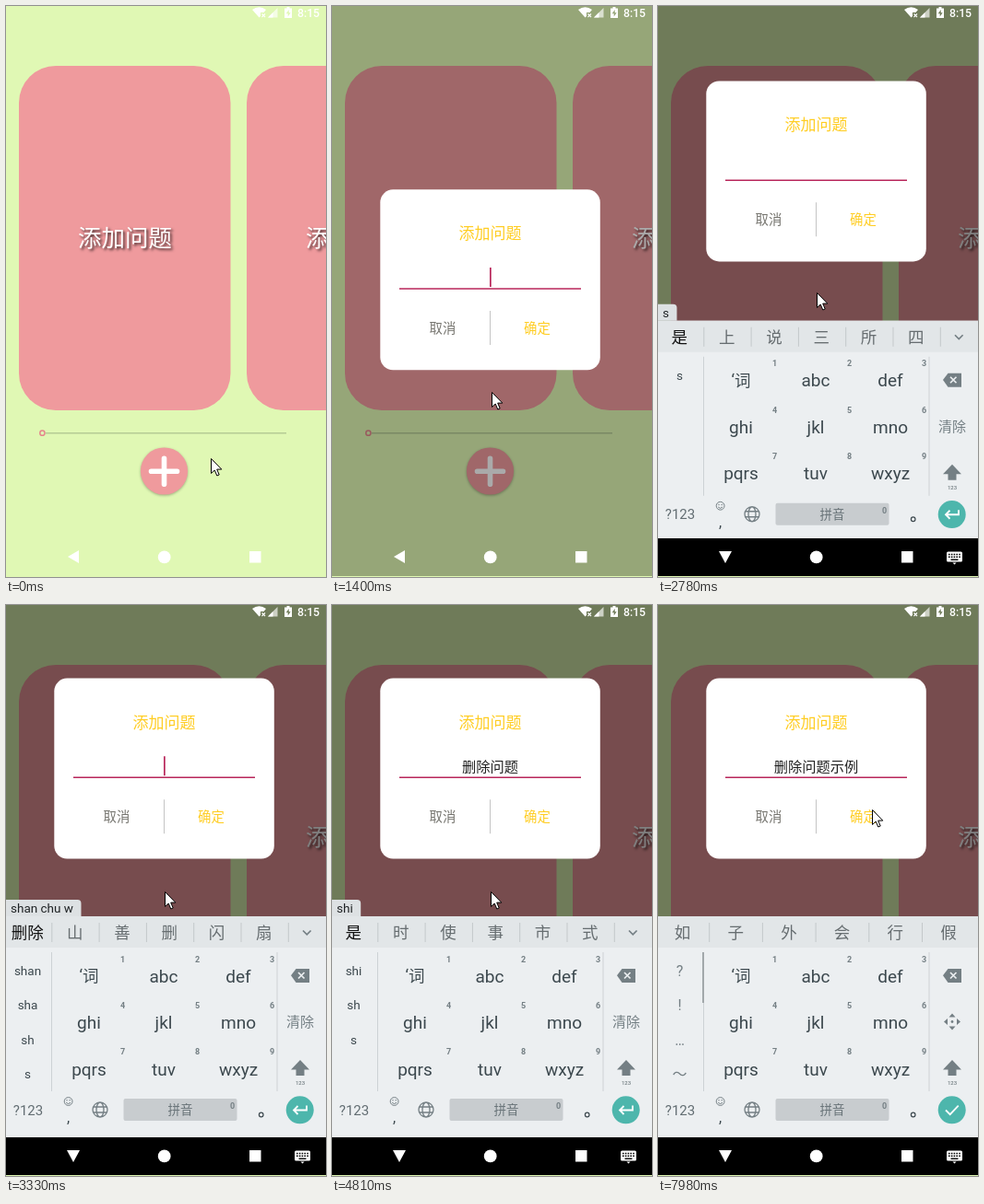
Animation of 347 by 620 pixels, one loop 8 s. Source, as an HTML page with a canvas:

```html
<!DOCTYPE html>
<html lang="zh-CN">
<head>
<meta charset="utf-8">
<style>
  html, body { margin: 0; width: 347px; height: 620px; overflow: hidden; background: #e0f8b4; }
  canvas { display: block; }
</style>
</head>
<body>
<canvas id="stage" width="347" height="620"></canvas>
<script>
const W = 347, H = 620, LOOP = 8000, TICK = 77.4;
const GREEN = '#e0f8b4', PINK = '#ef9a9d', YELLOW = '#ffcd22', ACCENT = '#b8265a';
const KEY = '#3c484e', SOFT = '#747f84', RULE = '#cdd2d5';
const FONT = 'Roboto, "Noto Sans CJK SC", "Noto Sans CJK", sans-serif';
const c = document.getElementById('stage').getContext('2d');

// Everything below is timed in screen ticks.
const POINTER = [[0, 222, 491], [4, 187, 500], [7, 187, 500], [9, 177, 500], [15, 177, 500],
  [16, 173, 473], [22, 172, 311], [77, 172, 311], [83, 116, 335], [85, 98, 344],
  [88, 147, 345], [91, 232, 351], [98, 232, 351], [103, 232, 222]];
const PINYIN = [[0, ''], [36, 's'], [37, 'sh'], [38, 'sha'], [39, 'shan'], [41, 'shan ch'],
  [42, 'shan chu'], [43, 'shan chu w'], [44, 'shan chu we'], [45, 'shan chu wen'],
  [46, 'shan chu wen t'], [47, 'shan chu wen ti'], [55, ''], [59, 's'], [60, 'sh'],
  [62, 'shi'], [63, 'shi l'], [64, 'shi li'], [93, '']];
const FIELD = [[0, ''], [55, '删除问题'], [93, '删除问题示例']];
const NEXT_WORDS = [[0, ''], [56, '是 的 和 了 在 就'], [93, ''], [95, '如 子 外 会 行 假']];
const BLINK_START = [[0, 16], [55, 55], [93, 93]];
const CANDIDATES = {
  'shan chu wen t': '删除问题 删除 山 善 删',
  'shan c': '删除 山 善 删 闪 扇',
  'shan': '山 善 删 闪 扇 衫',
  'sha': '啥 杀 傻 沙 纱 厦',
  'shi l': '实例 实力 势力 视力 示例 市里',
  'shi': '是 时 使 事 市 式',
  'sh': '是 上 说 时 使 事',
  's': '是 上 说 三 所 四'
};

const clamp = v => Math.max(0, Math.min(1, v));
const easeOut = (v, power) => 1 - (1 - clamp(v)) ** power;
const valueAt = (list, n) => list.filter(e => e[0] <= n).pop()[1];

function pointerAt(n) {
  const i = POINTER.findIndex(p => p[0] > n);
  if (i < 0) return POINTER[POINTER.length - 1].slice(1);
  const [a, b] = [POINTER[i - 1], POINTER[i]], k = (n - a[0]) / (b[0] - a[0]);
  return [1, 2].map(j => Math.round(a[j] + (b[j] - a[j]) * k));
}

function rect(x, y, w, h, color, r = 0) {
  c.fillStyle = color;
  c.beginPath();
  c.roundRect(x, y, w, h, r);
  c.fill();
}
function disc(x, y, r, color) {
  c.fillStyle = color;
  c.beginPath();
  c.arc(x, y, r, 0, 7);
  c.fill();
}
function fill(d, color) {
  c.fillStyle = color;
  c.fill(new Path2D(d));
}
function stroke(d, color, width = 1, cap = 'butt') {
  c.strokeStyle = color;
  c.lineWidth = width;
  c.lineCap = cap;
  c.stroke(new Path2D(d));
}
function text(s, x, y, size, color, align = 'center', weight = 400) {
  c.font = `${weight} ${size}px ${FONT}`;
  c.textAlign = align;
  c.fillStyle = color;
  c.fillText(s, x, y + size * 0.37);
}
function shadow(color, blur, dx, dy) {
  c.shadowColor = color;
  c.shadowBlur = blur;
  c.shadowOffsetX = dx;
  c.shadowOffsetY = dy;
}

function drawHome(n) {
  rect(0, 0, W, H, GREEN);
  for (const x of [14, 261]) {
    rect(x, 65, 229.5, 374, PINK, 40);
    c.save();
    shadow('rgba(0,0,0,.7)', 3, 2, 2);
    text('添加问题', x + 115, 252, 25.5, '#fff');
    c.restore();
  }
  stroke('M43 463.7H304', '#b6cc95', 1.5);
  stroke('M42 463.7a2.6 2.6 0 1 1-5.2 0a2.6 2.6 0 1 1 5.2 0', '#e5868c', 1.5);

  const pressed = n >= 12 && n <= 14;
  c.save();
  shadow('rgba(0,0,0,.3)', pressed ? 8 : 3, 0, pressed ? 3 : 1);
  disc(171.5, 505, 25.6, PINK);
  c.restore();
  if (pressed) disc(171.5, 505, 25.6, 'rgba(255,255,255,.2)');
  stroke('M157.5 505.3H185.5M171.5 491.3V519.3', '#fff', 5.6, 'round');
}

function drawStatusBar() {
  fill('M267 4Q274.500 -1.500 282 4L279.500 7H276V11L274.500 12.500Z', '#fff');
  stroke('M277.500 8.500l3.500 3.500m0-3.500l-3.500 3.500', '#fff', 1.1);
  fill('M284 12.500L294.500 2V12.500Z', 'rgba(255,255,255,.65)');
  fill('M284 12.500L289.500 7V12.500Z', '#fff');
  fill('M302 2.500h2.500v-1.500h3v1.500h2.500v10.500h-8ZM306.700 4l-3 4.300h2v3.200l3-4.300h-2Z', '#fff');
  text('8:15', 328, 7.3, 12.3, '#fff', 'center', 500);
}

function drawNavBar(n) {
  if (n >= 34) rect(0, 578, W, 41, '#000');
  fill(n >= 32 ? 'M66 592H80L73 605Z' : 'M67 598L79 591V605Z', '#fff');
  disc(171.7, 598.4, 6.9, '#fff');
  rect(264, 592, 12.5, 12.5, '#fff');
  if (n < 32) return;
  rect(313, 592.5, 17, 11, '#fff', 1.5);
  for (let i = 0; i < 10; i++) rect(315 + i % 5 * 2.8, i < 5 ? 594.7 : 597.5, 1.6, 1.6, '#000');
  rect(317.5, 600.5, 8, 1.4, '#000');
  fill('M319.500 604.500h4l-2 2Z', '#fff');
}

function drawDialog(n, lift) {
  const ms = (n - 16) * TICK + 19;
  const scale = 0.9 + 0.1 * easeOut(ms / 220, 5);
  c.save();
  c.globalAlpha = easeOut(ms / 150, 3);
  c.translate(171.5, 297 - lift);
  c.scale(scale, scale);
  c.translate(-171.5, -297);
  rect(52.3, 199.3, 238.5, 196, '#fff', 14);
  text('添加问题', 171.5, 247, 17, YELLOW);
  text('取消', 120, 349.2, 14.4, '#76756f');
  text('确定', 222.5, 349.2, 14.4, YELLOW);
  rect(171, 331, 1, 37, '#c4c4c4');
  rect(73, 306.3, 197, 1.5, ACCENT);

  const value = valueAt(FIELD, n), size = 15.25;
  text(value, 171.5, 294.8, size, '#202020');
  const visible = Math.floor((n - valueAt(BLINK_START, n)) / 6.5) % 2 === 0;
  if (visible) rect(171 + value.length * size / 2, 284, 1.7, 21, ACCENT);
  c.restore();
}

function drawCandidates(pinyin, n) {
  rect(0, 338, W, 34, '#e2e6e8');
  if (!pinyin) {
    const words = valueAt(NEXT_WORDS, n);
    if (words) words.split(' ').forEach((word, i) => {
      text(word, 26.5 + i * 57.7, 355.5, 17.5, '#666d70');
      if (i) rect(i * 57.7 - 2.5, 345, 1, 21, '#c3c8ca');
    });
    return;
  }
  c.font = `400 13.5px ${FONT}`;
  rect(0, 320, 13.5 + c.measureText(pinyin).width, 18, '#dde1e3', [0, 4, 0, 0]);
  text(pinyin, 5, 329.3, 13.5, '#202426', 'left');

  const key = Object.keys(CANDIDATES).find(k => pinyin.startsWith(k));
  let left = -2;
  CANDIDATES[key].split(' ').forEach((word, i) => {
    const width = word.length > 2 ? 102.6 : 51.3;
    text(word, left + width / 2 - 0.3, 355.5, 17.5, i ? '#666d70' : '#111', 'center', i ? 400 : 500);
    left += width;
    rect(left, 345, 1, 21, '#c3c8ca');
  });
  stroke('M322 353.500l4.300 4.300l4.300-4.300', SOFT, 1.7);
}

function drawKeyboard(n, offset) {
  const pinyin = valueAt(PINYIN, n);
  c.save();
  c.beginPath();
  c.rect(0, 0, W, 578);
  c.clip();
  c.translate(0, offset);
  rect(0, 338, W, 240, '#eceff1');
  drawCandidates(pinyin, n);

  rect(49, 377, 1, 151, RULE);
  rect(293.5, 377, 1, 151, RULE);
  if (pinyin) {
    const first = pinyin.split(' ')[0];
    for (let i = 0; i < first.length; i++)
      text(first.slice(0, first.length - i), 23.5, 397 + i * 37.5, 13.5, KEY);
  } else {
    ['?', '!', '…', '～'].forEach((s, i) => text(s, 23.500, 397 + i * 37.5, 16, SOFT));
    rect(48, 377, 2, 55, '#a2a8ab');
  }

  ['‘词', 'abc', 'def', 'ghi', 'jkl', 'mno', 'pqrs', 'tuv', 'wxyz'].forEach((label, i) => {
    const x = i % 3 * 81, y = Math.floor(i / 3) * 50.4;
    text(label, 90 + x, 402.7 + y, i ? 19 : 17.5, KEY);
    text(i + 1, 126.5 + x, 384.3 + y, 9, SOFT, 'center', 700);
  });

  fill('M309 402.300L314.500 395H329V410H314.500Z', SOFT);
  stroke('M317 399l6.500 6.500m0-6.500l-6.500 6.500', '#eceff1', 1.7);
  if (pinyin) text('清除', 319, 452.7, 15, SOFT);
  else {
    fill('M319 443.500l3.500 4h-7ZM319 461.500l3.500-4h-7ZM310 452.500l4-3.500v7ZM328 452.500l-4-3.500v7Z', SOFT);
    disc(319, 452.5, 1.4, SOFT);
  }
  fill('M319 494L329 504.500H323.500V511H314.500V504.500H309Z', SOFT);
  text('123', 319, 519, 6, SOFT, 'center', 500);

  text('?123', 24, 548, 15, '#626d72');
  stroke('M72 539a4.400 4.400 0 1 1-8.800 0a4.400 4.400 0 1 1 8.800 0M65.200 540.300q2.400 2.600 4.800 0', SOFT, 1);
  disc(66, 537.7, 0.7, SOFT);
  disc(69.2, 537.7, 0.7, SOFT);
  text(',', 67.5, 556, 16, KEY);
  stroke('M110 548a8 8 0 1 1-16 0a8 8 0 1 1 16 0M106 548a4 8 0 1 1-8 0a4 8 0 1 1 8 0M95 545H109M95 551H109', SOFT, 1.3);
  rect(127.5, 536, 123, 24, '#c8cccf', 2);
  text('拼音', 189, 548, 13.5, '#687378');
  text('0', 245.5, 543.5, 9, SOFT, 'center', 700);
  stroke('M279 553.500a2.300 2.300 0 1 1-4.600 0a2.300 2.300 0 1 1 4.600 0', KEY, 1.2);

  disc(318.7, 548.3, 15, '#4db6ac');
  stroke(pinyin ? 'M326 543.500v5H312.500m4-4.500l-4.500 4.500l4.500 4.500' : 'M312 548.500l4.700 4.700l9-9.500', '#fff', 1.8);
  c.restore();
}

function drawPointer([x, y]) {
  c.save();
  c.translate(x + 0.5, y + 0.5);
  const arrow = 'M0 0V16L3.700 12.500L6.300 18.500L8.700 17.500L6.200 11.600H11.300Z';
  fill(arrow, '#fff');
  stroke(arrow, '#000', 1);
  c.restore();
}

function draw(n) {
  drawHome(n);
  if (n >= 16) {
    rect(0, 0, W, H, `rgba(0,0,0,${0.5 * clamp((n - 16) / 3)})`);
    const rise = n < 34 ? 0 : easeOut((n - 33) / 4, 3);
    drawDialog(n, 119.7 * rise);
    if (rise) drawKeyboard(n, 240 * (1 - rise));
  }
  drawStatusBar();
  drawNavBar(n);
  drawPointer(pointerAt(n));
  rect(0, 619, W, 1, GREEN);
}

function frame() {
  draw(Math.floor((performance.now() % LOOP + 8) / TICK));
  requestAnimationFrame(frame);
}
frame();
</script>
</body>
</html>
```
